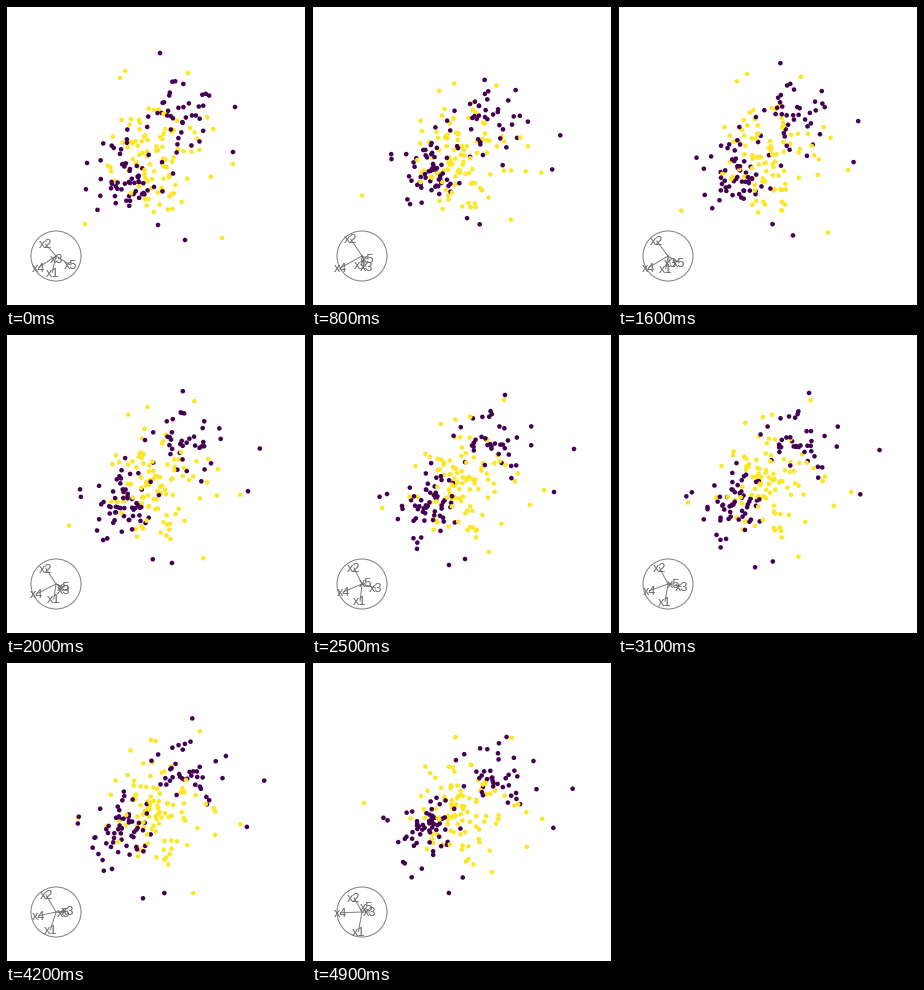
Recreate the animation shown at these times as a matplotlib script. Size 300 by 300 pixels, loop 5 s.

```python
import numpy as np
import matplotlib.pyplot as plt
from matplotlib.animation import FuncAnimation
from matplotlib.patches import Circle, Rectangle

SIZE, DPI = 300, 100
FRAMES, STEP = 50, 100
PX = 72 / DPI
HUB, RADIUS = np.array([50, 250]), 25
DARK, LIGHT = "#440154", "#fde725"
LINE, INK = "#7f7f7f", "#686868"


def orthonormal(m):
    """Nearest matrix with orthonormal rows."""
    u, _, vt = np.linalg.svd(m, full_matrices=False)
    return u @ vt


def blend(p, q, t):
    return orthonormal((1 - t) * p + t * q)


def pose(*tips):
    """Plane from the tips of the axes x1..x5, in pixels from the hub."""
    return orthonormal(np.array(tips).T / RADIUS)


start = pose((-4, 17), (-10, -12), (0, 3), (-17, 12), (14, 9))
tilt = pose((-1, 9), (-11, -17), (4, 11), (-21, 12), (6, 3))
wide = pose((-2, 17), (-8, -16), (14, 4), (-19, 8), (4, -1))
late = pose((-6, 18), (-10, -17), (12, -1), (-18, 4), (8, 1))
end = pose((-4, 20), (-8, -14), (8, 0), (-22, 1), (5, -5))

# The tour overshoots, turns back, and rests for one step at its peak
peak = blend(blend(wide, late, 0.6), start, 0.35)
TOUR = [(0, start), (8, tilt), (12, blend(start, tilt, 1.12)),
        (16, blend(start, tilt, 0.5)), (25, wide),
        (31, blend(wide, late, 0.3)), (36, peak), (37, peak),
        (42, late), (49, end)]


def plane(i):
    for (a, p), (b, q) in zip(TOUR, TOUR[1:]):
        if i <= b:
            return blend(p, q, (i - a) / (b - a))


LIFT = np.linalg.pinv(np.vstack([start, wide])).T
rng = np.random.default_rng(5)


def lift(*views):
    """Five-dimensional points from their places in two planes."""
    return (np.array(views, float) - SIZE / 2) @ LIFT


def cloud(n, view, sd, sd3):
    spread = np.array([sd, sd, sd3, sd, sd])
    return lift(view) + np.clip(rng.normal(size=(n, 5)), -2, 2) * spread


dark = np.vstack([
    lift((229, 101, 262, 115), (227, 146, 242, 158), (154, 47, 193, 61),
         (179, 234, 153, 225), (152, 219, 137, 231), (81, 157, 75, 160)),
    cloud(30, (126, 180, 122, 174), 11, 22),
    cloud(26, (116, 162, 112, 166), 20, 22),
    cloud(38, (171, 112, 178, 114), 20, 20),
])
light = np.vstack([
    lift((182, 67, 192, 66), (79, 218, 70, 174), (216, 232, 177, 218),
         (227, 158, 232, 156), (114, 72, 129, 90)),
    cloud(55, (152, 158, 147, 153), 23, 23),
    cloud(40, (154, 132, 158, 133), 28, 24),
])
data = np.vstack([dark, light])
colors = np.array([DARK] * len(dark) + [LIGHT] * len(light))
order = rng.permutation(len(data))
data, colors = data[order], colors[order]

fig = plt.figure(figsize=(SIZE / DPI, SIZE / DPI), dpi=DPI, facecolor="white")
ax = fig.add_axes([0, 0, 1, 1])
ax.set(xlim=(0, SIZE), ylim=(SIZE, 0))
ax.axis("off")
ax.add_patch(Rectangle((0.5, 0.5), SIZE - 1, SIZE - 1, fill=False,
                       ec="black", lw=PX, snap=False))
ax.add_patch(Circle(HUB, RADIUS, fill=False, ec=LINE, lw=PX))
spokes = [ax.plot([], [], color=LINE, lw=PX)[0] for _ in range(5)]
labels = [ax.text(0, 0, f"x{k + 1}", color=INK, family="Liberation Sans",
                  size=12.8 * PX, ha="center", va="baseline", zorder=4)
          for k in range(5)]
dots = ax.scatter(data[:, 0], data[:, 1], s=(4.6 * PX) ** 2, c=colors,
                  linewidths=0, zorder=3)


def update(i):
    p = plane(i)
    dots.set_offsets(data @ p.T + SIZE / 2)
    for spoke, label, tip in zip(spokes, labels, HUB + RADIUS * p.T):
        spoke.set_data(*zip(HUB, tip))
        label.set_position(tip + [0, 4.3])
    return [dots, *spokes, *labels]


anim = FuncAnimation(fig, update, frames=FRAMES, interval=STEP,
                     repeat=True, repeat_delay=0, blit=False)
plt.show()
```
